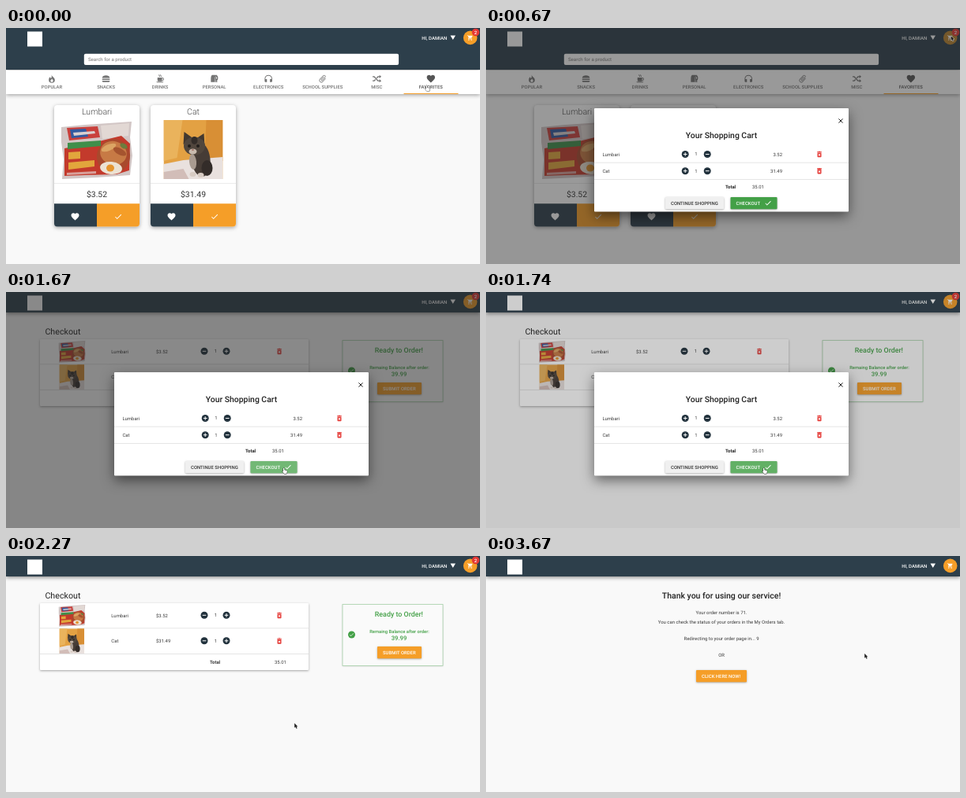
These frames come from a looping animation (600 by 300 pixels, 3.73 s). An HTML page with a canvas:

```html
<!DOCTYPE html>
<html lang="en">
<head>
<meta charset="utf-8">
<title>Shop checkout</title>
<style>
html, body { margin: 0; width: 100%; height: 100%; overflow: hidden; background: #f9f9f9; }
canvas { display: block; width: 600px; height: 300px; }
</style>
</head>
<body>
<canvas id="stage"></canvas>
<script>
const LOOP = 3730;
const NAVY = '#2d3f4b', ORANGE = '#f59e28', GREEN = '#43a047', RED = '#e53935', INK = '#3a3a3a';
const OPEN = 540, CHECKOUT = 1670, CLOSED = 1870, DONE = 2805, TICK = 3340;

const canvas = document.getElementById('stage');
const ctx = canvas.getContext('2d');
const dpr = window.devicePixelRatio || 1;
canvas.width = 600 * dpr;
canvas.height = 300 * dpr;
ctx.scale(dpr, dpr);

// Icons on a 24-unit grid
const icons = {
  heart: 'M12 21.4l-1.5-1.3C5.4 15.4 2 12.3 2 8.5 2 5.4 4.4 3 7.5 3c1.7 0 3.4.8 4.5 2.1C13.1 3.8 14.8 3 16.5 3 19.6 3 22 5.4 22 8.5c0 3.8-3.4 6.9-8.6 11.5z',
  check: 'M9 16.2L4.8 12l-1.4 1.4L9 19 21 7l-1.4-1.4z',
  flame: 'M11 1c1 5 9 8 9 14a8 8 0 0 1-16 0c0-4 2-6 4-8 0 2 0 3 1.500 4C12 9 12 5 11 1zM12.500 12c-1 2-4 3-4 5.500a3.500 3.500 0 0 0 7 0c0-2.500-2-3-3-5.500z',
  burger: 'M2 10C2 1 22 1 22 10zM2 12h20v3H2zM2 17h20v1a3 3 0 0 1-3 3H5a3 3 0 0 1-3-3z',
  cup: 'M5 9h13a4 4 0 0 1 0 8h-1a3 3 0 0 1-3 2H8a3 3 0 0 1-3-3zM17 11v4h1a2 2 0 0 0 0-4zM2 20h19a3 3 0 0 1-3 2H5a3 3 0 0 1-3-2zM8 1h2q0 2 1 3t1 3h-2q0-2-1-3t-1-3zM12 1h2q0 2 1 3t1 3h-2q0-2-1-3t-1-3z',
  roll: 'M6 2h11q-3 3-3 8v11H3V10q0-6 3-8zM18 2q4 2 4 8t-4 8-3-8 3-8zM17 8v4h2V8zM15 18h5v3h-5z',
  headset: 'M12 2a10 10 0 0 0-10 10v6c0 1.7 1.3 3 3 3h3v-8H4v-1a8 8 0 0 1 16 0v1h-4v8h3c1.7 0 3-1.3 3-3v-6A10 10 0 0 0 12 2z',
  clip: 'M16.5 6v11.5a4 4 0 0 1-8 0V5a2.5 2.5 0 0 1 5 0v10.5a1 1 0 0 1-2 0V6H10v9.5a2.5 2.5 0 0 0 5 0V5a4 4 0 0 0-8 0v12.5a5.5 5.5 0 0 0 11 0V6z',
  shuffle: 'M1 5h5l10 11h3v-3l5 4.5-5 4.500v-3h-4.500L4.500 8H1zM1 16h3.500l3-3 2 2.200L6 19H1zM11 9.500l3.500-4.500H19V2l5 4.500-5 4.500V8h-3l-3 3.700z',
  cart: 'M7 18a2 2 0 1 0 0 4 2 2 0 0 0 0-4zM1 2v2h2l3.6 7.6L5.2 14c-.7 1.4.3 3 1.8 3h12v-2H7.4l1-2h7.2c.8 0 1.4-.4 1.8-1l3.5-6.5A1 1 0 0 0 20 4H5.2l-.9-2zM17 18a2 2 0 1 0 0 4 2 2 0 0 0 0-4z',
  trash: 'M6 19c0 1.1.9 2 2 2h8c1.1 0 2-.9 2-2V7H6zM8.5 11.9l1.4-1.4 2.1 2.1 2.1-2.1 1.4 1.4-2.1 2.1 2.1 2.1-1.4 1.4-2.1-2.1-2.1 2.1-1.4-1.4 2.1-2.1zM15.5 4l-1-1h-5l-1 1H5v2h14V4z',
  arrow: 'M0 0V17L4 13.4 6.8 20 10 18.6 7.2 12.3H12z',
  hand: 'M0 1.5Q2-1 4 1.500V8l8 2q3 1 2 5l-2 7H3L-3 14q-1-2 1-2l2 1z'
};
for (const name in icons) icons[name] = new Path2D(icons[name]);

const clamp = v => Math.min(1, Math.max(0, v));
const ease = v => { v = clamp(v); return v * v * (3 - 2 * v); };

// The y of cubic-bezier(.4, 0, .2, 1) at x
function standard(x) {
  let lo = 0, hi = 1, u = x;
  for (let i = 0; i < 16; i++) {
    u = (lo + hi) / 2;
    const bx = 3 * u * (1 - u) * (1 - u) * .4 + 3 * u * u * (1 - u) * .2 + u * u * u;
    if (bx < x) lo = u; else hi = u;
  }
  return 3 * u * u * (1 - u) + u * u * u;
}

function text(str, x, y, size = 5.95, color = INK, weight = 400, align = 'left') {
  ctx.font = `${weight} ${size}px Roboto, sans-serif`;
  ctx.textAlign = align;
  ctx.fillStyle = color;
  ctx.fillText(str, x, y);
}
const centred = (str, x, y, size, color, weight) => text(str, x, y, size, color, weight, 'center');

function rect(x, y, w, h, color, r = 0) {
  ctx.fillStyle = color;
  ctx.beginPath();
  ctx.roundRect(x, y, w, h, r);
  ctx.fill();
}

function raised(x, y, w, h, color, r, blur, drop, alpha) {
  ctx.save();
  ctx.shadowColor = `rgba(0,0,0,${alpha})`;
  ctx.shadowBlur = blur * dpr;
  ctx.shadowOffsetY = drop * dpr;
  rect(x, y, w, h, color, r);
  ctx.restore();
}

function oval(x, y, rx, ry, color, turn = 0) {
  ctx.fillStyle = color;
  ctx.beginPath();
  ctx.ellipse(x, y, rx, ry, turn, 0, 7);
  ctx.fill();
}
const disc = (x, y, r, color) => oval(x, y, r, r, color);

function poly(color, ...pts) {
  ctx.fillStyle = color;
  ctx.beginPath();
  for (let i = 0; i < pts.length; i += 2) ctx.lineTo(pts[i], pts[i + 1]);
  ctx.fill();
}

function line(x1, y1, x2, y2, color, width) {
  ctx.strokeStyle = color;
  ctx.lineWidth = width;
  ctx.beginPath();
  ctx.moveTo(x1, y1);
  ctx.lineTo(x2, y2);
  ctx.stroke();
}

function icon(name, x, y, size, color, turn = 0) {
  ctx.save();
  ctx.translate(x, y);
  ctx.rotate(turn);
  ctx.scale(size / 24, size / 24);
  ctx.translate(-12, -12);
  ctx.fillStyle = color;
  ctx.fill(icons[name], 'evenodd');
  ctx.restore();
}

function button(label, x, y, w, fill, color) {
  raised(x, y, w, 15.3, fill, 1, 2.5, .8, .35);
  text(label, x + 7, y + 9.9, 5.95, color, 500);
}

function round(x, y, plus) {
  disc(x, y, 4.5, '#22323d');
  line(x - 2.3, y, x + 2.3, y, '#fff', 1);
  if (plus) line(x, y - 2.3, x, y + 2.3, '#fff', 1);
}

function photo(x, y, w, h, scale, draw) {
  ctx.save();
  ctx.translate(x, y);
  ctx.scale(scale, scale);
  ctx.beginPath();
  ctx.rect(0, 0, w, h);
  ctx.clip();
  draw();
  ctx.restore();
}

function noodles() {
  poly('#d2c6c5', 0, 9, 30, 6, 60, 4, 89, 2, 87, 22, 90, 45, 87, 70, 45, 73, 1, 75, 3, 50, 0, 28);
  poly('#e2d8d4', 50, 7, 86, 4, 85, 20, 52, 24);
  poly('#c33a2c', 4, 36, 48, 27, 76, 20, 87, 30, 86, 64, 70, 69, 30, 70, 4, 71);
  oval(66, 46, 21, 22, '#a9492d', .3);
  oval(66, 42, 17, 15, '#c77a45', .3);
  oval(60, 35, 10, 4, '#dca564', -.4);
  oval(74, 40, 9, 4, '#a5542f', .5);
  oval(79, 33, 5, 3, '#6d7c3d', .5);
  oval(63, 61, 14, 8, '#ece2d3', .1);
  oval(62, 61, 5, 4.500, '#e5952f');
  poly('#c9403c', 7, 10, 46, 8, 49, 22, 10, 26);
  poly('#325aa0', 11, 12, 31, 11, 34, 21, 13, 23);
  poly('#d9d0d0', 15, 16, 42, 14, 43, 17, 16, 20);
  poly('#3f8f4a', 8, 29, 50, 26, 50, 33, 8, 37);
  poly('#e2a63c', 9, 41, 24, 40, 24, 49, 9, 50);
  poly('#e2a63c', 9, 54, 42, 51, 42, 59, 9, 63);
  poly('#d9a09a', 7, 67, 44, 65, 44, 68, 7, 70);
}

function kitten() {
  rect(0, 0, 75, 75, '#e3a143');
  poly('#eab35c', 0, 0, 24, 0, 17, 48, 0, 52);
  poly('#d88f35', 54, 0, 75, 0, 75, 52, 52, 50);
  poly('#e9e1de', 0, 56, 25, 51, 75, 47, 75, 75, 0, 75);
  poly('#d2bdb8', 0, 66, 25, 62, 32, 75, 0, 75);
  oval(47, 50, 12, 22, '#463c36', -.12);
  oval(55, 61, 7, 10, '#332c29');
  poly('#43382f', 25, 31, 26, 15, 37, 23);
  poly('#43382f', 42, 23, 51, 17, 52, 34);
  oval(39, 33, 13.500, 11.500, '#51463d');
  oval(39, 26, 4, 5, '#332c28');
  oval(37, 40, 5, 3.500, '#c9bbae');
  oval(37, 53, 4.500, 10, '#a99b90', -.1);
  disc(32.5, 33, 2, '#221e1c');
  disc(43.5, 33, 2, '#221e1c');
  oval(37, 38, 1.5, 1, '#a8786c');
  oval(37, 69, 4, 3, '#d8ccc4');
  oval(47, 70, 4, 3, '#d8ccc4');
}

function header(t, height) {
  raised(0, 0, 600, height, NAVY, 0, 5, 1.5, .45);
  rect(27, 4.5, 19, 19, '#fff');
  text('HI, DAMIAN', 526.3, 14.9, 6, '#fff', 500);
  poly('#fff', 562.5, 9.5, 569, 9.5, 565.75, 15);
  const hover = t > 400 && t < 820;
  disc(587.7, 12.4, 8.8, hover ? '#b9822e' : ORANGE);
  icon('cart', 587.5, 12.5, 8, '#fff');
  if (t < DONE) {
    disc(594.5, 5.5, 4.8, RED);
    centred('2', 594.5, 7.7, 6, '#fff', 500);
  }
}

const tabs = [
  ['POPULAR', 'flame'], ['SNACKS', 'burger'], ['DRINKS', 'cup'], ['PERSONAL', 'roll'],
  ['ELECTRONICS', 'headset'], ['SCHOOL SUPPLIES', 'clip'], ['MISC', 'shuffle'], ['FAVORITES', 'heart']
];

function card(x, name, price) {
  raised(x, 98, 108, 154.5, '#fff', 4, 5, 1.5, .35);
  centred(name, x + 54, 109.6, 10.6, '#444', 300);
  rect(x, 197, 108, .7, '#e4e4e4');
  centred(price, x + 54, 214.7, 10.4, '#333');
  rect(x, 223.3, 54, 29.2, NAVY, [0, 0, 0, 4]);
  rect(x + 54, 223.3, 54, 29.2, ORANGE, [0, 0, 4, 0]);
  icon('heart', x + 26.5, 239.8, 12, '#fff');
  icon('check', x + 81, 239.7, 11, '#fff');
}

function favorites(t) {
  header(t, 53);
  raised(0, 53.4, 600, 30.6, '#fff', 0, 5, 1.5, .35);
  rect(98.8, 32.7, 398.3, 14.4, '#fff', 2);
  text('Search for a product', 104, 42.2, 6.1, '#777');
  tabs.forEach(([label, glyph], i) => {
    const x = 58 + i * 68.55, favorite = glyph === 'heart', color = favorite ? '#555' : '#747474';
    icon(glyph, x, 64.5, favorite ? 12.5 : 11.5, color, glyph === 'clip' ? .75 : 0);
    centred(label, x, 77.3, 5.9, color, 500);
  });
  rect(503.5, 83, 69, 1, ORANGE);
  card(61, 'Lumbari', '$3.52');
  photo(70, 117, 91, 76, 1, noodles);
  card(183, 'Cat', '$31.49');
  photo(199.5, 117, 75, 75, 1, kitten);
}

function checkoutRow(y, name, price) {
  text(name, 133.3, y + 2.2);
  text(price, 190, y + 2.2);
  round(251, y - .2, false);
  centred('1', 265.5, y + 1.9);
  round(279, y - .2, true);
  icon('trash', 346, y, 10, RED);
}

function checkout(t) {
  header(t, 26);
  text('Checkout', 49.4, 54, 10.7, '#222');
  raised(43, 60, 340, 85, '#fff', 1, 3, 1, .35);
  rect(43, 91.5, 340, .7, '#ddd');
  rect(43, 124.3, 340, .7, '#ddd');
  photo(66.5, 61.3, 91, 76, .38, noodles);
  photo(67.5, 92.3, 75, 75, .422, kitten);
  checkoutRow(75.5, 'Lumbari', '$3.52');
  checkoutRow(108, 'Cat', '$31.49');
  text('Total', 258, 137, 5.95, INK, 700);
  text('35.01', 340, 137);

  raised(426, 61.5, 127, 78, '#fafafa', 1, 2, .5, .25);
  ctx.strokeStyle = '#a9d3ab';
  ctx.lineWidth = .8;
  ctx.strokeRect(426, 61.5, 127, 78);
  centred('Ready to Order!', 497.4, 76.8, 8.9, GREEN, 500);
  disc(437.5, 100, 4.5, GREEN);
  icon('check', 437.5, 100, 7, '#fff');
  centred('Remaing Balance after order:', 498, 98.2, 5.8, GREEN, 500);
  centred('39.99', 497.5, 107.3, 7.7, GREEN, 500);
  button('SUBMIT ORDER', 470, 115, 56, ORANGE, '#fff');
}

function thanks(t) {
  header(t, 26);
  centred('Thank you for using our service!', 298, 54, 10.5, '#222', 500);
  centred('Your order number is 71.', 298, 73.8);
  centred('You can check the status of your orders in the My Orders tab.', 298, 85.8);
  centred('Redirecting to your order page in... ' + (t < TICK ? 10 : 9), 298, 106.7);
  centred('OR', 298, 127.7);
  button('CLICK HERE NOW!', 266, 145, 64, ORANGE, '#fff');
}

function cartRow(y, name, price) {
  text(name, 147.5, y + 2);
  round(252.2, y, true);
  centred('1', 266, y + 1.9);
  round(280.2, y, false);
  text(price, 375, y + 2, 5.95, INK, 400, 'right');
  icon('trash', 422, y, 10, RED);
}

function ripple(t) {
  const grow = ease((t - 1540) / 130), fade = clamp((t - 1680) / 140);
  if (!grow) return;
  ctx.save();
  ctx.beginPath();
  ctx.rect(309.5, 215, 59, 15.3);
  ctx.clip();
  disc(353, 223, 50 * grow, `rgba(255,255,255,${.25 - .2 * fade})`);
  ctx.restore();
}

function modal(t) {
  raised(137, 102, 322, 131.4, '#fff', 1, 16, 6, .5);
  line(446.4, 115.4, 451.6, 120.6, '#222', 1);
  line(451.6, 115.4, 446.4, 120.6, '#222', 1);
  centred('Your Shopping Cart', 298, 140.3, 10.4, '#222', 500);
  cartRow(160.5, 'Lumbari', '3.52');
  rect(137, 170.8, 322, .7, '#ddd');
  cartRow(181.7, 'Cat', '31.49');
  rect(137, 192, 322, .7, '#ddd');
  text('Total', 303, 204.3, 5.95, '#222', 700);
  text('35.01', 337, 204.3);
  button('CONTINUE SHOPPING', 227, 215, 74, '#f0f0f0', '#333');
  button('CHECKOUT', 309.5, 215, 59, GREEN, '#fff');
  ripple(t);
  icon('check', 357, 222.5, 10, '#fff');
}

function shade(t) {
  const shown = t < 1655
    ? standard(clamp((t - OPEN) / 225))
    : 1 - standard(clamp((t - 1655) / 225));
  return .55 * shown;
}

const moves = [
  [60, 430, 588.5, 10],
  [730, 1330, 351, 223.6],
  [2180, 2620, 479.2, 124]
];

function cursor(t) {
  let x = 531.8, y = 73;
  for (const [from, to, nx, ny] of moves) {
    const k = ease((t - from) / (to - from));
    x += (nx - x) * k;
    y += (ny - y) * k;
  }
  const overTab = t < 430 && y > 56;
  const overCheckout = t > 1000 && t < CLOSED && y > 215 && x < 368;
  const overSubmit = t > 2180 && t < DONE && x > 470 && y < 130;
  const hand = overTab || overCheckout || overSubmit;
  ctx.save();
  ctx.translate(x, y);
  ctx.scale(.34, .34);
  ctx.lineJoin = 'round';
  ctx.lineWidth = 2.4;
  ctx.fillStyle = hand ? '#fff' : '#222';
  ctx.strokeStyle = hand ? '#222' : '#eee';
  const shape = icons[hand ? 'hand' : 'arrow'];
  ctx.stroke(shape);
  ctx.fill(shape);
  ctx.restore();
}

function render(t) {
  ctx.textRendering = 'geometricPrecision';
  rect(0, 0, 600, 300, '#f9f9f9');
  if (t < CHECKOUT) favorites(t);
  else if (t < DONE) checkout(t);
  else thanks(t);
  if (t >= OPEN && t < CLOSED) {
    rect(0, 0, 600, 300, `rgba(40,40,40,${shade(t)})`);
    modal(t);
  }
  cursor(t);
}

const start = performance.now();
function frame() {
  render((performance.now() - start) % LOOP);
  requestAnimationFrame(frame);
}
frame();
</script>
</body>
</html>
```
